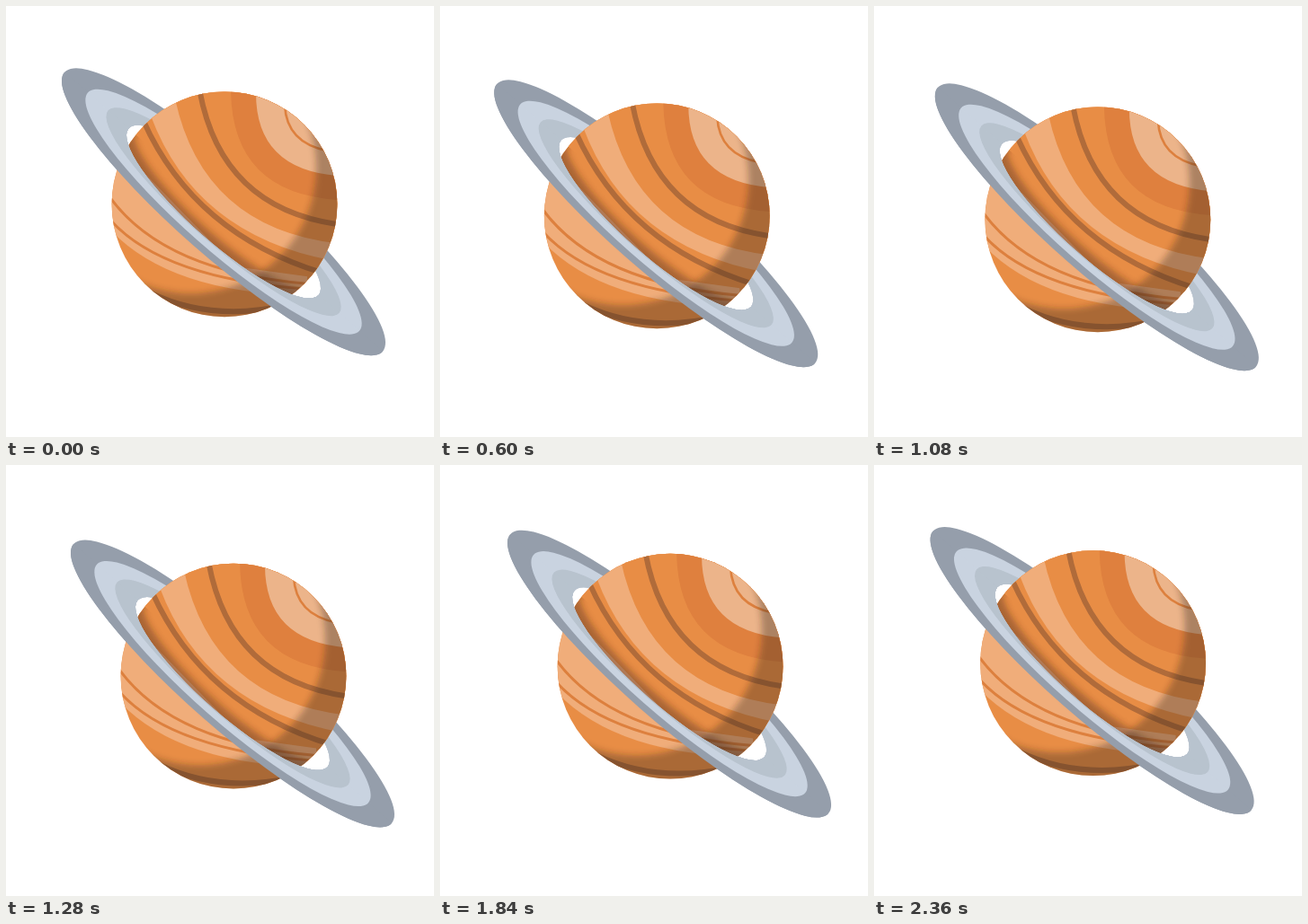
An HTML page that plays this animation: 476x480 px, repeating every 2400 ms.

```html
<!DOCTYPE html>
<html lang="en">
<head>
<meta charset="utf-8">
<title>Ringed planet</title>
<style>
  html, body { margin: 0; width: 100%; height: 100%; overflow: hidden; background: #fff; }
  svg { display: block; width: 476px; height: 480px; }
</style>
</head>
<body>
<svg viewBox="0 0 476 480">
  <defs>
    <clipPath id="globe"><circle cx="243" cy="220.6" r="125.4"/></clipPath>
    <mask id="front" maskUnits="userSpaceOnUse" x="-240" y="-2" width="480" height="62">
      <rect x="-240" y="0" width="480" height="60" fill="#fff"/>
    </mask>
    <filter id="soft" x="-20%" y="-30%" width="140%" height="160%"><feGaussianBlur stdDeviation="3.5"/></filter>
    <g id="ring" fill-rule="evenodd"></g>
  </defs>
  <g id="planet">
    <use href="#ring" transform="translate(242 229) rotate(41.3)"/>
    <g clip-path="url(#globe)">
      <rect x="110" y="90" width="270" height="270" fill="#e88d45"/>
      <g id="bands" fill="none"></g>
      <g transform="translate(242 229) rotate(41.3)" mask="url(#front)">
        <ellipse rx="140.5" ry="35" fill="none" stroke="#4a2a18" stroke-opacity=".4" stroke-width="17" filter="url(#soft)"/>
      </g>
      <path d="M60 40H430V400H60ZM65 180a140 140 0 1 0 280 0a140 140 0 1 0 -280 0Z"
            fill="#3a2a20" fill-opacity=".36" fill-rule="evenodd" filter="url(#soft)"/>
    </g>
    <g transform="translate(242 229) rotate(41.3)"><use href="#ring" mask="url(#front)"/></g>
  </g>
</svg>
<script>
const LOOP = 2400, FRAME = 40;
const BASE = '#e88d45', LIGHT = '#f0ad7a', BROWN = '#b06b3a', THIN = '#dd803e';
const $ = id => document.getElementById(id);

const oval = (rx, ry) => `M${-rx} 0A${rx} ${ry} 0 1 0 ${rx} 0A${rx} ${ry} 0 1 0 ${-rx} 0Z`;
const annulus = (rx, ry, color) => `<path d="${oval(rx, ry)}${oval(140.5, 35)}" fill="${color}"/>`;
$('ring').innerHTML =
  annulus(235.5, 50.3, '#959eab') + annulus(201, 43, '#c9d3e0') + annulus(171, 36, '#b8c3ce');

// Quadratic arc through a start, middle and end point
const arc = (x0, y0, mx, my, x1, y1) =>
  `M${x0} ${y0}Q${2 * mx - (x0 + x1) / 2} ${2 * my - (y0 + y1) / 2} ${x1} ${y1}`;
const line = (pts, color, width) =>
  `<path d="${arc(...pts)}" stroke="${color}" stroke-width="${width}"/>`;
const area = (pts, color) => `<path d="${arc(...pts)}L420 200V60H200Z" fill="${color}"/>`;

$('bands').innerHTML =
  `<path d="${arc(117, 250, 205, 303, 335, 322)}V230L117 150Z" fill="${LIGHT}"/>` +
  line([115, 212, 200, 278, 335, 309], THIN, 3) +
  line([116, 238, 200, 290, 335, 315], THIN, 3) +
  line([160, 319, 232, 339, 312, 333], BROWN, 6) +
  // upper hemisphere, from the equator to the pole
  `<path d="M100 130L255 290L350 303L420 200V60H100Z" fill="${BASE}"/>` +
  area([161, 122, 236, 228.5, 362, 283], LIGHT) +
  area([188, 103, 248.5, 215, 368, 264], BASE) +
  line([153, 128, 231, 233, 352, 297], BROWN, 6) +
  line([215, 92, 266.4, 197, 373, 243.5], BROWN, 6) +
  area([250, 92, 281, 182, 373, 216], '#df803e') +
  area([278, 95, 300.5, 162, 370, 189], '#ecb48a') +
  line([310, 110, 323, 144, 358, 161], THIN, 2.6);

// Drift positions, evenly spaced around the loop
const path = [[0, .2], [-1.4, 4.7], [-2.1, 10.3], [-.8, 15.8], [3.2, 18],
  [8.5, 15.7], [12.6, 11.5], [16, 6.3], [11, 2.6], [5, 1.2]];

function drift(phase) {
  const n = path.length, i = Math.floor(phase * n), f = phase * n - i;
  const [a, b, c, d] = [-1, 0, 1, 2].map(k => path[(i + k + n) % n]);
  return [0, 1].map(k => b[k] + f / 2 * (c[k] - a[k] +
    f * (2 * a[k] - 5 * b[k] + 4 * c[k] - d[k] + f * (3 * (b[k] - c[k]) + d[k] - a[k]))));
}

function draw() {
  const t = Math.floor(performance.now() % LOOP / FRAME) * FRAME;
  $('planet').setAttribute('transform', `translate(${drift(t / LOOP)})`);
  requestAnimationFrame(draw);
}
draw();
</script>
</body>
</html>
```
